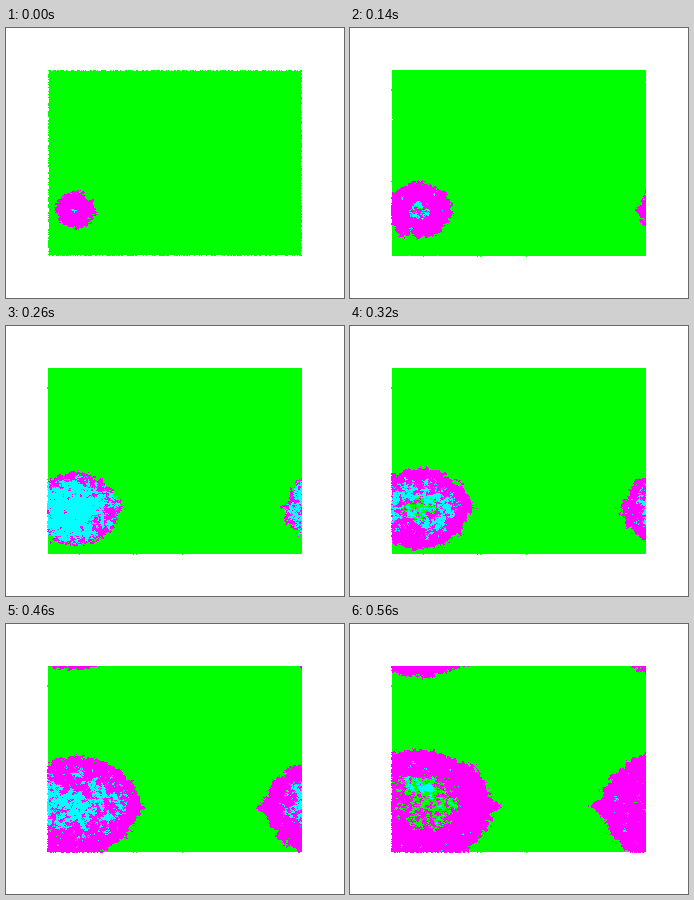
These frames come from a looping animation (338x270 px, 580 ms). A matplotlib script:

```python
import numpy as np
import matplotlib.pyplot as plt
from matplotlib.animation import FuncAnimation

STAGE_W, STAGE_H, DPI = 338, 270, 64
LEFT, TOP, W, H = 42, 42, 254, 186
CX, CY = 26.5, 140
STEPS, STEP_MS = 29, 20

WHITE, GREEN, MAGENTA, CYAN = range(4)
PALETTE = np.array([[255, 255, 255], [0, 255, 0],
                    [255, 0, 255], [0, 255, 255]], dtype=np.uint8)

rng = np.random.default_rng(11)


def noise(sigma=0):
    """Periodic Gaussian noise of unit variance, blurred by sigma pixels."""
    field = rng.normal(size=(H, W))
    if sigma:
        fy = np.fft.fftfreq(H)[:, None]
        fx = np.fft.fftfreq(W)[None, :]
        blur = np.exp(-2 * (np.pi * sigma) ** 2 * (fx ** 2 + fy ** 2))
        field = np.fft.ifft2(np.fft.fft2(field) * blur).real
    return field / field.std()


def patchy():
    return 0.5 * noise(4) + 0.6 * noise(1.2) + 0.5 * noise()


# Offsets from the seed on a torus
ys, xs = np.mgrid[0:H, 0:W]
dx = (xs - CX + W / 2) % W - W / 2
dy = (ys - CY + H / 2) % H - H / 2
rho = np.hypot(dx, 1.3 * dy)
lean = (dx - 1.3 * dy) / 40

rough = 1.0 * noise(2.5) + 1.3 * noise(1) + 0.9 * noise()
specks = (noise(1.5) > 1.5) & (noise() > 0.6)
tip = np.exp(-(dy / 6) ** 2)


def pulse(start, slope, reach, life, rest, rest_reach, skew=0):
    """Times at which each cell turns cyan, then green, then magenta."""
    on = start + slope * rho + 0.7 * patchy()
    span = life * (1 - (rho / reach) ** 3) + skew * lean
    off = on + np.maximum(0, span + 0.7 * patchy())
    gap = rest * (1 - (rho / rest_reach) ** 2) + 0.4 * noise()
    return on, off, off + np.where(span > 0, np.maximum(0, gap), 0)


pulses = [pulse(-0.3, 0.42, 13, 5.5, 0.3, 6),
          pulse(11, 0.05, 46, 4.4, 1.8, 18),
          pulse(22.3, 0.03, 50, 4, 2, 50, skew=0.9)]

edge_rand = rng.random((H, W))
border = np.ones((H, W), bool)
border[1:-1, 1:-1] = False
left_rand, low_rand = rng.random(H), rng.random(W)


def cells(k):
    rx, ry = 20 + 1.87 * k, 18 + 1.37 * k
    q = np.hypot(dx / (rx * (1 + 0.005 * k * tip)), dy / ry)
    inside = q < 1 + rough / rx
    grid = np.where(inside, MAGENTA, GREEN)
    ring = (q > 0.6) & (q < 0.85) & (k > 3)
    grid[inside & ring & specks] = CYAN
    for on, off, end in pulses:
        grid[inside & (on <= k) & (k < off)] = CYAN
        grid[inside & (off <= k) & (k < end)] = GREEN
    return grid


def spill(line, rand):
    """Stray dots just outside one side of the field."""
    chance = np.where(line == GREEN, 0.03, 0.5)
    return np.where(rand < chance, line, WHITE)


def picture(k):
    grid = cells(k)
    stage = np.full((STAGE_H, STAGE_W), WHITE)
    if k:
        stage[TOP:TOP + H, LEFT - 1] = spill(grid[:, 0], left_rand)
        stage[TOP + H, LEFT:LEFT + W] = spill(grid[-1], low_rand)
    grid[border & (edge_rand < 0.5 ** (k + 1))] = WHITE
    stage[TOP:TOP + H, LEFT:LEFT + W] = grid
    return PALETTE[stage]


fig = plt.figure(figsize=(STAGE_W / DPI, STAGE_H / DPI), dpi=DPI,
                 facecolor="white")
ax = fig.add_axes([0, 0, 1, 1])
ax.axis("off")
image = ax.imshow(picture(0), interpolation="nearest", aspect="auto")


def update(k):
    image.set_data(picture(k))
    return [image]


anim = FuncAnimation(fig, update, frames=STEPS, interval=STEP_MS,
                     repeat=True, repeat_delay=0, blit=False)
plt.show()
```
